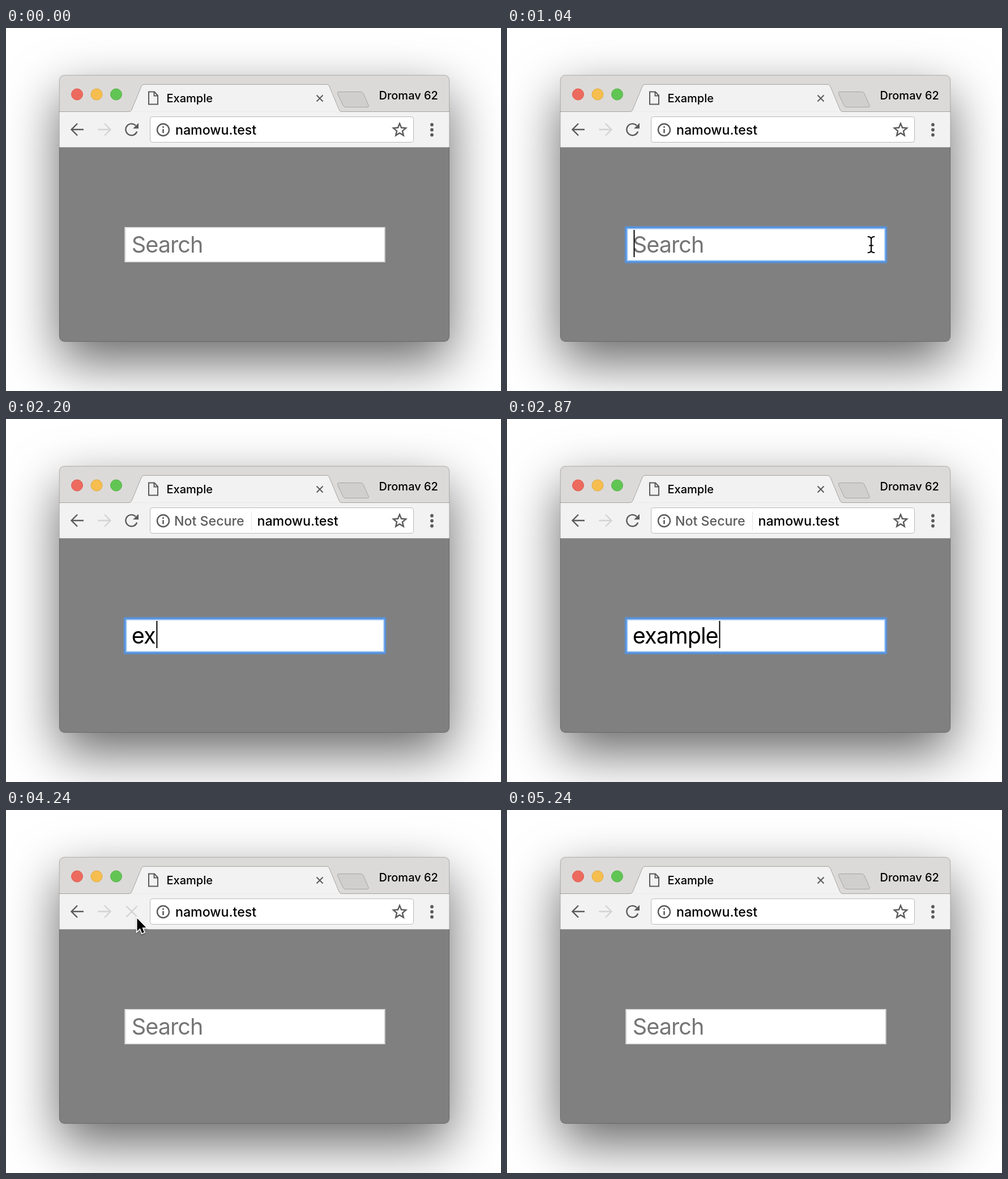
An HTML page that plays this animation: 874x640 px, repeating every 5280 ms.

```html
<!DOCTYPE html>
<html lang="en">
<head>
<meta charset="utf-8">
<title>Search field</title>
<style>
  html, body { margin: 0; width: 100%; height: 100%; overflow: hidden; background: #fff; }
  #stage { position: relative; width: 874px; height: 640px; overflow: hidden; }
  #shadow {
    position: absolute; left: 94px; top: 83px; width: 689px; height: 470px;
    border-radius: 9px; box-shadow: 0 35px 92px rgba(0, 0, 0, .6), 0 0 1px rgba(0, 0, 0, .5);
  }
  svg { position: absolute; left: 0; top: 0; }
  text { font-family: Inter, "Open Sans", sans-serif; font-optical-sizing: none; white-space: pre; }
  .tab { font-size: 20px; font-weight: 450; }
  .url { font-size: 23.2px; font-weight: 450; }
  .field { font-size: 39.6px; letter-spacing: -.95px; }
  .icon { fill: none; stroke: #5a5a5a; stroke-width: 2.4; }
  .thin { stroke-width: 2; }
  .pale { stroke: #d3d3d3; }
  .solid { fill: #5a5a5a; }
</style>
</head>
<body>
<div id="stage">
  <div id="shadow"></div>
  <svg width="874" height="640" viewBox="0 0 874 640">
    <defs>
      <clipPath id="frame"><rect x="94" y="83" width="689" height="470" rx="9"/></clipPath>
      <filter id="soft" x="-50%" y="-50%" width="200%" height="200%">
        <feDropShadow dx="0" dy="1.5" stdDeviation="1.3" flood-opacity=".4"/>
      </filter>
    </defs>

    <g clip-path="url(#frame)">
      <rect x="94" y="83" width="689" height="65" fill="#dcdad8"/>
      <rect x="94" y="147.5" width="689" height="63" fill="#f2f2f2"/>
      <rect x="94" y="211" width="689" height="342" fill="#808080"/>
      <path d="M94 147.5H217Q220.5 147.5 222 144L239 103Q240.5 99.5 244 99.5H566Q569.5 99.5 571 103L588 144Q589.5 147.5 593 147.5H783"
            fill="#f2f2f2" stroke="#a3a3a3"/>
      <path d="M94 210.5H783" stroke="#a0a0a0"/>
    </g>
    <rect x="94.5" y="83.5" width="688" height="469" rx="8.5" fill="none" stroke="#000" stroke-opacity=".17"/>

    <circle cx="125.5" cy="117" r="10" fill="#ed6a5e" stroke="#dd5d52"/>
    <circle cx="160" cy="117" r="10" fill="#f6be4f" stroke="#e0ac45"/>
    <circle cx="194.5" cy="117" r="10" fill="#61c554" stroke="#56b349"/>

    <path d="M588 112.5H626Q629.5 112.5 631 115.5L640 136Q641.5 139.5 638 139.5H600Q596.5 139.5 595 136.5L585.5 116Q584.5 112.5 588 112.5Z"
          fill="#d0cfce" stroke="#a6a6a6"/>
    <path class="icon thin" d="M252 112.5H262L268 119V134.5H252ZM261.5 112.5V119.5H268"/>
    <text class="tab" x="283.5" y="131">Example</text>
    <path class="icon thin" d="M548.5 118.5L559.5 129.5M559.5 118.5L548.5 129.5"/>
    <text class="tab" x="658.5" y="126">Dromav 62</text>

    <path class="icon" d="M137 179H116M126 168.5L115.5 179L126 189.5"/>
    <path class="icon pale" d="M162.5 179H184M174 168.5L184.5 179L174 189.5"/>
    <g id="reload">
      <path class="icon" d="M231.2 182.5A10.2 10.2 0 1 1 229 172"/>
      <path class="solid" d="M234 167.5V177.3H224.2Z"/>
    </g>
    <path id="stop" class="icon pale" d="M212.5 169.5L231.5 188.5M231.5 169.5L212.5 188.5"/>

    <rect x="254.5" y="156.5" width="465" height="45" rx="4" fill="#fff" stroke="#b9b9b9"/>
    <circle class="icon" cx="277.5" cy="179.5" r="10.5"/>
    <path class="solid" d="M276.2 173.3h2.6v2.7h-2.6ZM276.2 178.2h2.6v7h-2.6Z"/>
    <g id="warning">
      <text class="url" x="297" y="188" fill="#5c5c5c">Not Secure</text>
      <path d="M433.5 163V196" stroke="#e3e3e3"/>
    </g>
    <text id="address" class="url" y="188">namowu.test</text>
    <path id="star" class="icon"/>
    <g class="solid">
      <circle cx="752" cy="170.5" r="2.9"/>
      <circle cx="752" cy="179.5" r="2.9"/>
      <circle cx="752" cy="188.5" r="2.9"/>
    </g>

    <g id="blurred">
      <rect x="209.5" y="351" width="460" height="62" fill="#fff"/>
      <rect x="211" y="352" width="457.5" height="60" fill="none" stroke="#c9c9c9"/>
    </g>
    <g id="focused">
      <rect x="207.5" y="349" width="464" height="66" rx="3" fill="#5b95dc" fill-opacity=".65"/>
      <rect x="209" y="350.5" width="461" height="63" rx="1" fill="#5392e2"/>
      <rect x="211.5" y="353" width="456.5" height="58" fill="#a8ccf4"/>
      <rect x="213.5" y="355" width="452.5" height="54" fill="#fff"/>
    </g>
    <text id="hint" class="field" x="221.8" y="396" fill="#757575">Search</text>
    <text id="typed" class="field" x="221.8" y="396"></text>
    <rect id="caret" y="356" width="2" height="48"/>

    <g id="arrow" filter="url(#soft)">
      <path d="M0 0V22.5L5.2 17.6L8.7 26L12.4 24.4L8.9 16.2H15.8Z"
            stroke="#fff" stroke-width="3.2" paint-order="stroke"/>
    </g>
    <path id="beam" fill="none" stroke="#000" stroke-width="2" stroke-linecap="round"
          d="M-5.5 -14Q0 -14 0 -9.5Q0 -14 5.5 -14M0 -9.5V9.5M-5.5 14Q0 14 0 9.5Q0 14 5.5 14M-3 1.5H3"/>
  </svg>
</div>

<script>
const LOOP = 5280;
const FOCUS = 960, RELOAD = 4130, RELEASE = 4700;
const WORD = "example";
const KEY_TIMES = [1980, 2120, 2290, 2400, 2510, 2600, 2695];
const BLINK = 500;

// time, x, y of the pointer
const MOVES = [
  [[620, 812, 370], [920, 643, 382], [KEY_TIMES[0], 643, 382]],
  [[3290, 643, 382], [3650, 270.5, 228], [3720, 270.5, 228], [3930, 231.5, 191],
   [4590, 231.5, 191], [5200, 362, 52]]
];

const el = id => document.getElementById(id);
const show = (id, on) => el(id).setAttribute("visibility", on ? "visible" : "hidden");
const ease = p => p * p * (3 - 2 * p);

function starPath(cx, cy, outer, inner) {
  let d = "";
  for (let i = 0; i < 10; i++) {
    const a = i * Math.PI / 5, r = i % 2 ? inner : outer;
    d += (i ? "L" : "M") + (cx + r * Math.sin(a)) + " " + (cy - r * Math.cos(a));
  }
  return d + "Z";
}

function pointerAt(t) {
  const run = MOVES.find(m => t >= m[0][0] && t < m[m.length - 1][0]);
  if (!run) return null;
  const i = run.findIndex(k => k[0] > t);
  const [t0, x0, y0] = run[i - 1], [t1, x1, y1] = run[i];
  const p = ease((t - t0) / (t1 - t0));
  return { x: x0 + (x1 - x0) * p, y: y0 + (y1 - y0) * p };
}

function drawPointer(t) {
  const pos = pointerAt(t);
  const inField = pos && pos.x > 210 && pos.x < 669 && pos.y > 351 && pos.y < 413;
  show("arrow", pos && !inField);
  show("beam", inField);
  if (pos) el(inField ? "beam" : "arrow").setAttribute("transform", `translate(${pos.x} ${pos.y})`);
}

function draw(t) {
  const focused = t >= FOCUS && t < RELOAD;
  const count = focused ? KEY_TIMES.filter(k => k <= t).length : 0;
  const lastInput = count ? KEY_TIMES[count - 1] : FOCUS;
  const loading = t >= RELOAD && t < RELEASE;

  show("blurred", !focused);
  show("focused", focused);
  show("hint", !count);
  show("warning", count);
  show("reload", !loading);
  show("stop", loading);

  const typed = el("typed");
  typed.textContent = WORD.slice(0, count);
  el("address").setAttribute("x", count ? 443.5 : 299);
  el("caret").setAttribute("x", 223.5 + (count ? typed.getComputedTextLength() : 0));
  show("caret", focused && Math.floor((t - lastInput) / BLINK) % 2 === 0);
  drawPointer(t);
}

el("star").setAttribute("d", starPath(695, 180, 11.6, 5.2));

const start = performance.now();
function tick() {
  draw((performance.now() - start) % LOOP);
  requestAnimationFrame(tick);
}
tick();
</script>
</body>
</html>
```
